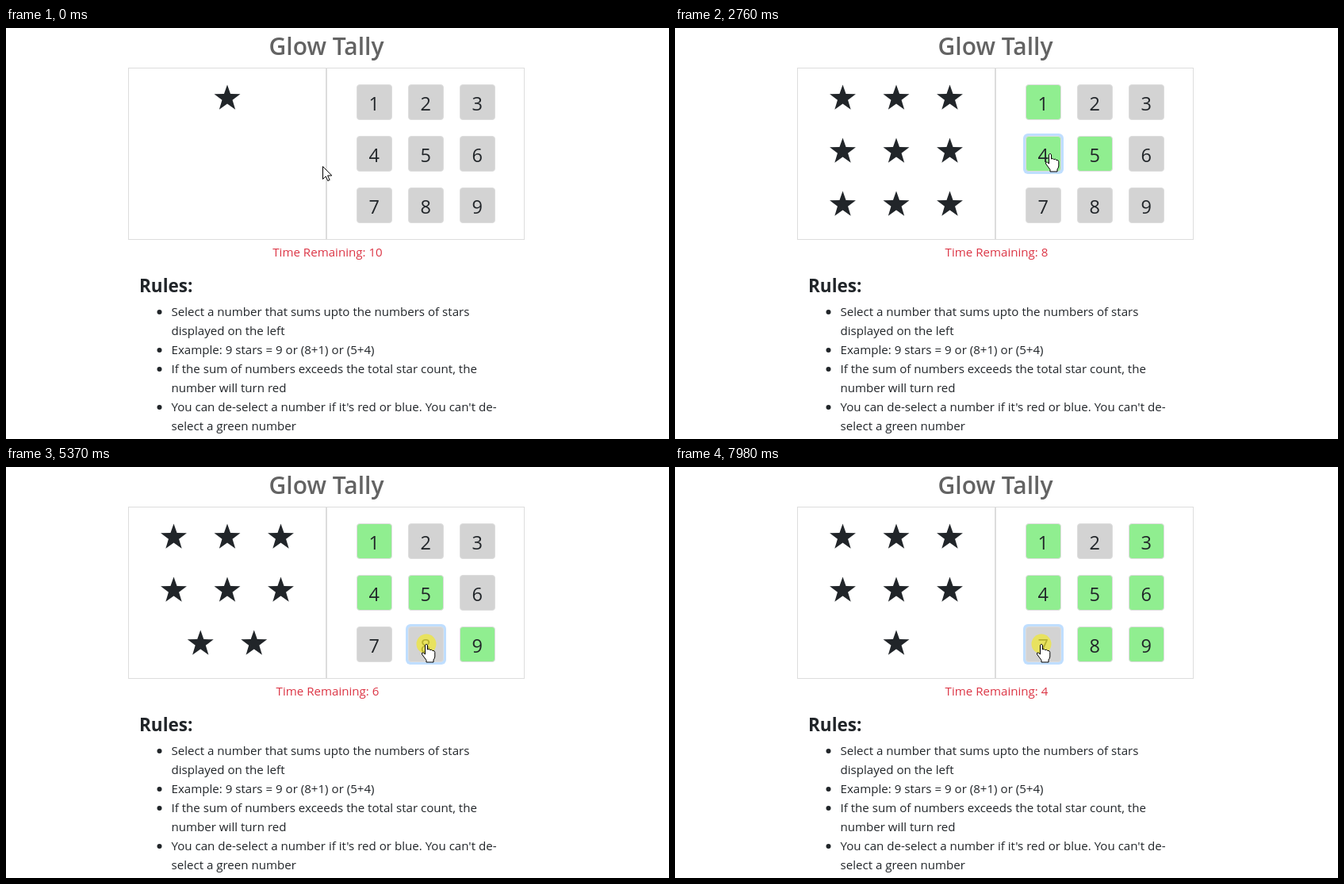
Write an HTML page that moves like this. It is 836 px wide and 518 px high and loops after 8000 ms.

```html
<!DOCTYPE html>
<html lang="en">
<head>
<meta charset="utf-8">
<title>Glow Tally</title>
<style>
  html, body { margin: 0; width: 100%; height: 100%; overflow: hidden; background: #fff; }
  svg { display: block; width: 836px; height: 518px; }
  text { font: 15.1px "Open Sans", "Noto Sans", sans-serif; fill: #212529; }
  .title { font-size: 30px; font-weight: 600; fill: #636363; text-anchor: middle; }
  .timer { fill: #dc3545; text-anchor: middle; }
  .heading { font-size: 22.5px; font-weight: 700; }
  .digit { font-size: 23.5px; text-anchor: middle; }
  .panel { fill: none; stroke: #ddd; }
  .key { stroke: #ddd; }
  .ring { fill: #bfdeff; }
  .cursor { fill: #fff; stroke: #000; stroke-linejoin: round; }
</style>
</head>
<body>
<svg viewBox="0 0 836 518">
  <text class="title" x="404" y="34">Glow Tally</text>
  <rect class="panel" x="154.5" y="50.5" width="249" height="216"/>
  <rect class="panel" x="404.5" y="50.5" width="249" height="216"/>
  <g id="stars" fill="#212529"></g>
  <g id="keys"></g>
  <text class="timer" id="timer" x="405.5" y="288"></text>
  <text class="heading" x="168" y="333">Rules:</text>
  <g id="rules"></g>
  <circle id="press" r="12.5" fill="#f0e832" opacity=".72"/>
  <path id="hand" class="cursor" d="M-1.5 1.5Q0-.8 1.5 1.5V7Q3.5 5.8 4.6 7.6Q6.8 6.6 7.8 8.4Q10.5 8 10.8 10.5V16Q10.5 18.5 9 20V23H0V20.5L-5.5 13Q-6 10.5-3.8 11L-1.5 13Z"/>
  <path id="arrow" class="cursor" d="M.5.5V16.5L4.2 13L6.8 18.6L9.2 17.5L6.6 12H11.8Z"/>
</svg>
<script>
const LOOP = 8000, SECOND = 1000, PRESS = 110, REST = 60;
const KEY = 45, PITCH = 65;
const byId = id => document.getElementById(id);

function add(parent, tag, attrs, text = '') {
  const el = document.createElementNS('http://www.w3.org/2000/svg', tag);
  for (const name in attrs) el.setAttribute(name, attrs[name]);
  el.textContent = text;
  return parent.appendChild(el);
}

const show = (el, on) => el.setAttribute('visibility', on ? 'visible' : 'hidden');
const move = (el, x, y) => el.setAttribute('transform', `translate(${x} ${y})`);

const rules = [
  ['Select a number that sums upto the numbers of stars', 'displayed on the left'],
  ['Example: 9 stars = 9 or (8+1) or (5+4)'],
  ['If the sum of numbers exceeds the total star count, the', 'number will turn red'],
  ["You can de-select a number if it's red or blue. You can't de-", 'select a green number']
];
let baseline = 363;
for (const rule of rules) {
  add(byId('rules'), 'circle', { cx: 193.5, cy: baseline - 5, r: 3, fill: '#212529' });
  for (const line of rule) {
    add(byId('rules'), 'text', { x: 208.5, y: baseline }, line);
    baseline += 24;
  }
}

const starPoints = Array.from({ length: 10 }, (_, i) => {
  const r = i % 2 ? 6.9 : 17.3, a = (i / 5 - 0.5) * Math.PI;
  return `${r * Math.cos(a)},${r * Math.sin(a)}`;
}).join(' ');
const stars = Array.from({ length: 9 }, () => add(byId('stars'), 'polygon', { points: starPoints }));

const keys = Array.from({ length: 9 }, (_, i) => {
  const x = 442 + PITCH * (i % 3), y = 71 + PITCH * Math.floor(i / 3), layer = byId('keys');
  const ring = add(layer, 'rect', { class: 'ring', x: x - 3, y: y - 3, width: KEY + 6, height: KEY + 6, rx: 6 });
  const face = add(layer, 'rect', { class: 'key', x: x + .5, y: y + .5, width: KEY - 1, height: KEY - 1, rx: 3.5 });
  add(layer, 'text', { class: 'digit', x: x + 22.3, y: y + 32.5 }, i + 1);
  return { digit: i + 1, x, y, ring, face };
});

// The player's moves; dx is how far from the key's middle the pointer lands.
const clicks = [
  { digit: 1, up: 1080, dx: 0 }, { digit: 5, up: 2250, dx: 0 },
  { digit: 4, up: 2700, dx: 8 }, { digit: 9, up: 3990, dx: 8 },
  { digit: 8, up: 5440, dx: 0 }, { digit: 6, up: 6680, dx: 6 },
  { digit: 3, up: 6950, dx: 3 }, { digit: 7, up: LOOP, dx: -3 }
];
const rounds = [1, 9, 9, 8, 9, 7];

// The countdown restarts its second with every click, as each one redraws the board.
function gameAt(t) {
  const game = { round: 0, time: 10, used: [], picked: [] };
  let nextTick = 450;
  const runClock = until => {
    for (; nextTick <= until; nextTick += SECOND) game.time--;
  };
  for (const { digit, up } of clicks.filter(c => c.up <= t)) {
    runClock(up);
    nextTick = up + SECOND;
    game.picked.push(digit);
    if (game.picked.reduce((a, b) => a + b) === rounds[game.round]) {
      game.used.push(...game.picked);
      game.picked = [];
      game.round++;
    }
  }
  runClock(t);
  return game;
}

// Wandering between the clicks, merged with a rest on every clicked key.
const wander = [
  { t: 0, x: 399, y: 174 }, { t: 420, x: 604, y: 150 },
  { t: 1400, x: 644, y: 274 }, { t: 1760, x: 554, y: 203 },
  { t: 3080, x: 602, y: 308 }, { t: 4220, x: 588, y: 246 },
  { t: 4760, x: 490, y: 254 }, { t: 6060, x: 648, y: 192 },
  { t: 7250, x: 625, y: 125 }
];
const rests = clicks.flatMap(({ digit, up, dx }) => {
  const key = keys[digit - 1], x = key.x + KEY / 2 + dx, y = key.y + KEY / 2 - 1;
  return [{ t: up - PRESS - REST, x, y }, { t: up + REST, x, y }];
});
const path = [...wander, ...rests].sort((a, b) => a.t - b.t);

function cursorAt(t) {
  const i = path.findIndex(p => p.t > t), a = path[i - 1], b = path[i];
  const k = (t - a.t) / (b.t - a.t), eased = k * k * (3 - 2 * k);
  return [Math.round(a.x + (b.x - a.x) * eased), Math.round(a.y + (b.y - a.y) * eased)];
}

function drawStars(count) {
  stars.forEach((star, i) => {
    const row = Math.floor(i / 3), inRow = Math.min(3, count - row * 3);
    show(star, i < count);
    move(star, 279 + 67.5 * (i % 3 - (inRow - 1) / 2), 88.7 + 67 * row);
  });
}

function drawKeys(t, { used, picked }) {
  const focused = clicks.filter(c => c.up - PRESS <= t).pop();
  for (const { digit, ring, face } of keys) {
    const fill = used.includes(digit) ? 'lightgreen' : picked.includes(digit) ? 'deepskyblue' : 'lightgray';
    face.setAttribute('fill', fill);
    show(ring, focused && focused.digit === digit);
  }
}

function drawCursor(t) {
  const [x, y] = cursorAt(t);
  const over = keys.some(k => x >= k.x && x < k.x + KEY && y >= k.y && y < k.y + KEY);
  for (const id of ['hand', 'arrow', 'press']) move(byId(id), x, y);
  show(byId('hand'), over);
  show(byId('arrow'), !over);
  show(byId('press'), clicks.some(c => t >= c.up - PRESS && t < c.up));
}

const start = performance.now();
function draw() {
  const t = (performance.now() - start) % LOOP, game = gameAt(t);
  drawStars(rounds[game.round]);
  drawKeys(t, game);
  byId('timer').textContent = `Time Remaining: ${game.time}`;
  drawCursor(t);
  requestAnimationFrame(draw);
}
draw();
</script>
</body>
</html>
```
